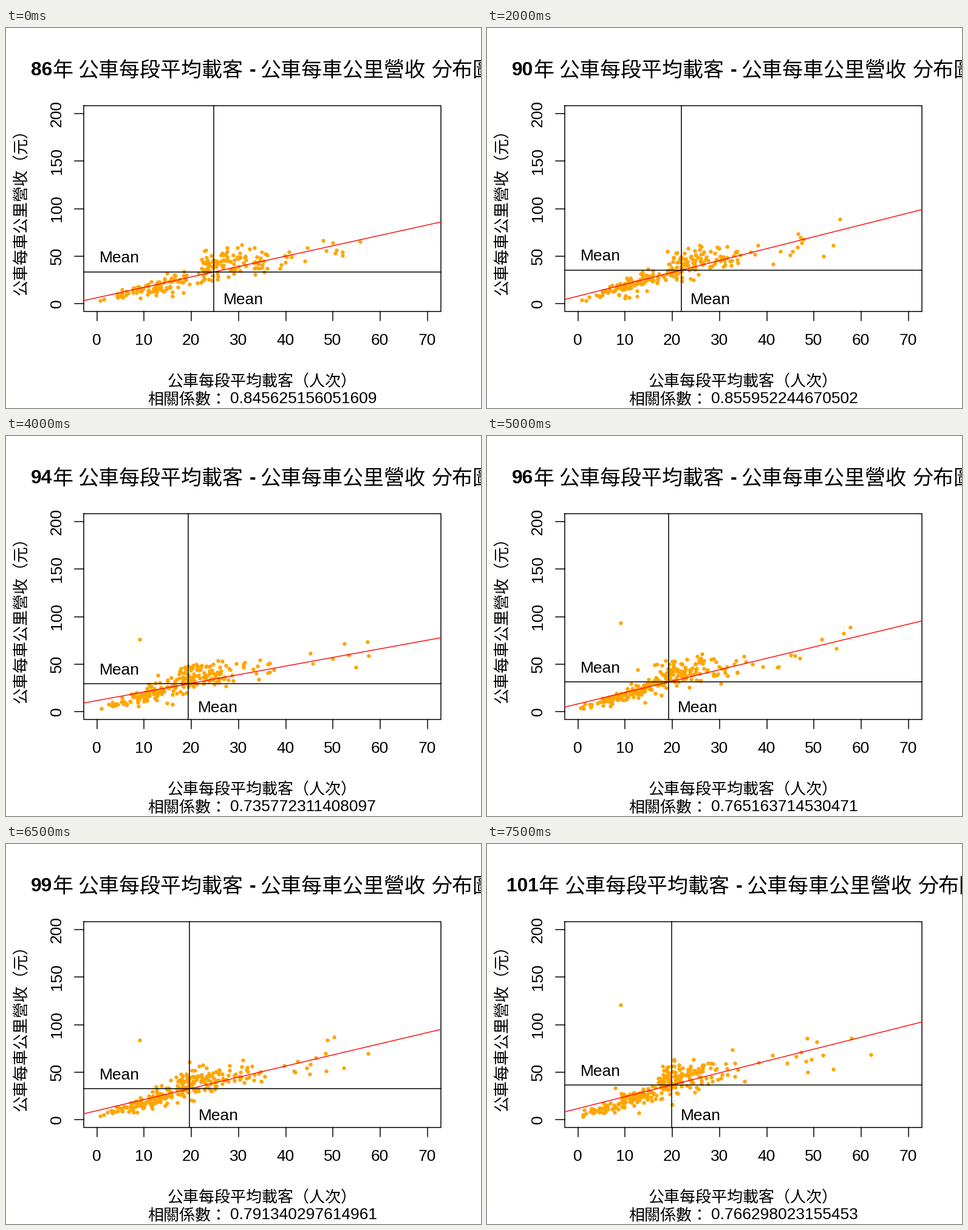
Recreate the animation shown at these times as a matplotlib script. Size 782 by 626 pixels, loop 8000 ms.

```python
import numpy as np
import matplotlib.pyplot as plt
from matplotlib.animation import FuncAnimation

W, H, DPI = 782, 626, 64
PT = 72 / DPI
LEFT, RIGHT, TOP, BOTTOM = 128, 716, 128, 467
X0, DX, Y0, DY = 149.5, 7.778, 454, 1.565
FIRST, LAST = 86, 101
SANS, CJK = "Liberation Sans", "Noto Sans CJK JP"

# Key years; the years between are interpolated
YEARS = [86, 88, 90, 94, 96, 99, 101]
MEAN_X = [24.8, 20.8, 21.9, 19.4, 19.2, 19.6, 19.8]
MEAN_Y = [33.3, 31.1, 35.2, 29.2, 31.1, 32.4, 36.4]
SLOPE = [1.095, 1.217, 1.251, 0.909, 1.2, 1.175, 1.251]
CORR = [0.845625156051609, 0.857920714483991, 0.855952244670502,
        0.735772311408097, 0.765163714530471, 0.791340297614961,
        0.766298023155453]


def px(x):
    return X0 + DX * x


def py(y):
    return Y0 - DY * y


def stats(year):
    return [float(np.interp(year, YEARS, col))
            for col in (MEAN_X, MEAN_Y, SLOPE, CORR)]


def cloud(year):
    """Dense low group, wider group above the mean and a sparse tail."""
    mx, my, slope, _ = stats(year)
    rng = np.random.default_rng(year)
    n = 105 + 2 * (year - FIRST)

    x1 = np.abs(rng.normal(0.55 * mx, 0.24 * mx, n)) + 0.5
    y1 = 3 + (my - 3) * x1 / mx + rng.standard_t(4, n) * (1 + 0.2 * x1)
    x2 = mx - 3 + rng.gamma(1.8, 4.5, n)
    y2 = my + 8 + 0.5 * slope * (x2 - mx) + rng.normal(0, 7, n)
    x3 = rng.uniform(42, 58, 8)
    y3 = my + slope * (x3 - mx) + rng.normal(0, 9, 8)

    x = np.concatenate([x1, x2, x3])
    y = np.concatenate([y1, y2, y3])
    if year >= 94:  # one route far above the rest
        x = np.append(x, 9)
        y = np.append(y, np.interp(year, [94, 96, 99, 101], [76, 93, 84, 121]))
    return px(np.minimum(x, 62)), py(np.maximum(y, 3 + 0.3 * x))


fig = plt.figure(figsize=(W / DPI, H / DPI), dpi=DPI, facecolor="white")
ax = fig.add_axes([0, 0, 1, 1])
ax.set_xlim(0, W)
ax.set_ylim(H, 0)
ax.axis("off")


def text(x, y, s, size=26.4, font=SANS, **kw):
    kw = {"ha": "left", "va": "baseline", "rotation_mode": "anchor", **kw}
    return ax.text(x, y, s, fontsize=size * PT, family=font, **kw)


def line(xs, ys, color="black", width=1.5, **kw):
    return ax.plot(xs, ys, color=color, lw=width * PT, **kw)[0]


# Frame, ticks and axis labels
line([LEFT, RIGHT, RIGHT, LEFT, LEFT], [TOP, TOP, BOTTOM, BOTTOM, TOP],
     solid_joinstyle="miter")
for v in range(0, 71, 10):
    line([px(v)] * 2, [BOTTOM, BOTTOM + 15])
    text(px(v) - 0.5, 522.5, str(v), ha="center")
for v in range(0, 201, 50):
    line([LEFT - 15, LEFT], [py(v)] * 2)
    text(91, py(v), str(v), ha="center", rotation=90)

text(266, 589.5, "公車每段平均載客（人次）", 26, CJK)
text(32, 440, "公車每車公里營收（元）", 26, CJK, rotation=90)
text(233, 620.5, "相關係數：", 26, CJK)
corr = text(369.5, 618, "")

# Title parts, each with its start
title = [
    (40.5, text(0, 78, "", 31.7, weight="bold")),
    (76, text(0, 80, "年", 34, CJK)),
    (118, text(0, 80, "公車每段平均載客", 34, CJK)),
    (400.5, text(0, 78, "-", 31.7, weight="bold")),
    (418, text(0, 80, "公車每車公里營收", 34, CJK)),
    (700, text(0, 80, "分布圖", 34, CJK)),
]

dots = ax.plot([], [], "o", color="#ffa500", ms=6.4 * PT, mew=0, zorder=1)[0]
fit = line([], [], "red", 1.4)
mean_v = line([], [])
mean_h = line([], [])
label_v = text(0, 455, "Mean")
label_h = text(153.5, 0, "Mean")


def update(i):
    year = FIRST + i
    mx, my, slope, r = stats(year)
    vx, hy = px(mx), py(my)

    dots.set_data(*cloud(year))
    ends = np.array([LEFT, RIGHT])
    fit.set_data(ends, hy - slope * (ends - vx) * DY / DX)
    mean_v.set_data([vx, vx], [TOP, BOTTOM])
    mean_h.set_data([LEFT, RIGHT], [hy, hy])
    label_v.set_x(vx + 15)
    label_h.set_y(hy - 15.5)
    corr.set_text(f"{r:.15f}")

    # A third digit widens the centred title
    shift = 8.8 if year > 99 else 0
    for k, (x, part) in enumerate(title):
        part.set_x(x + (shift if k else -shift))
    title[0][1].set_text(str(year))
    return []


anim = FuncAnimation(fig, update, frames=LAST - FIRST + 1, interval=500,
                     repeat=True, repeat_delay=0, blit=False)
plt.show()
```
